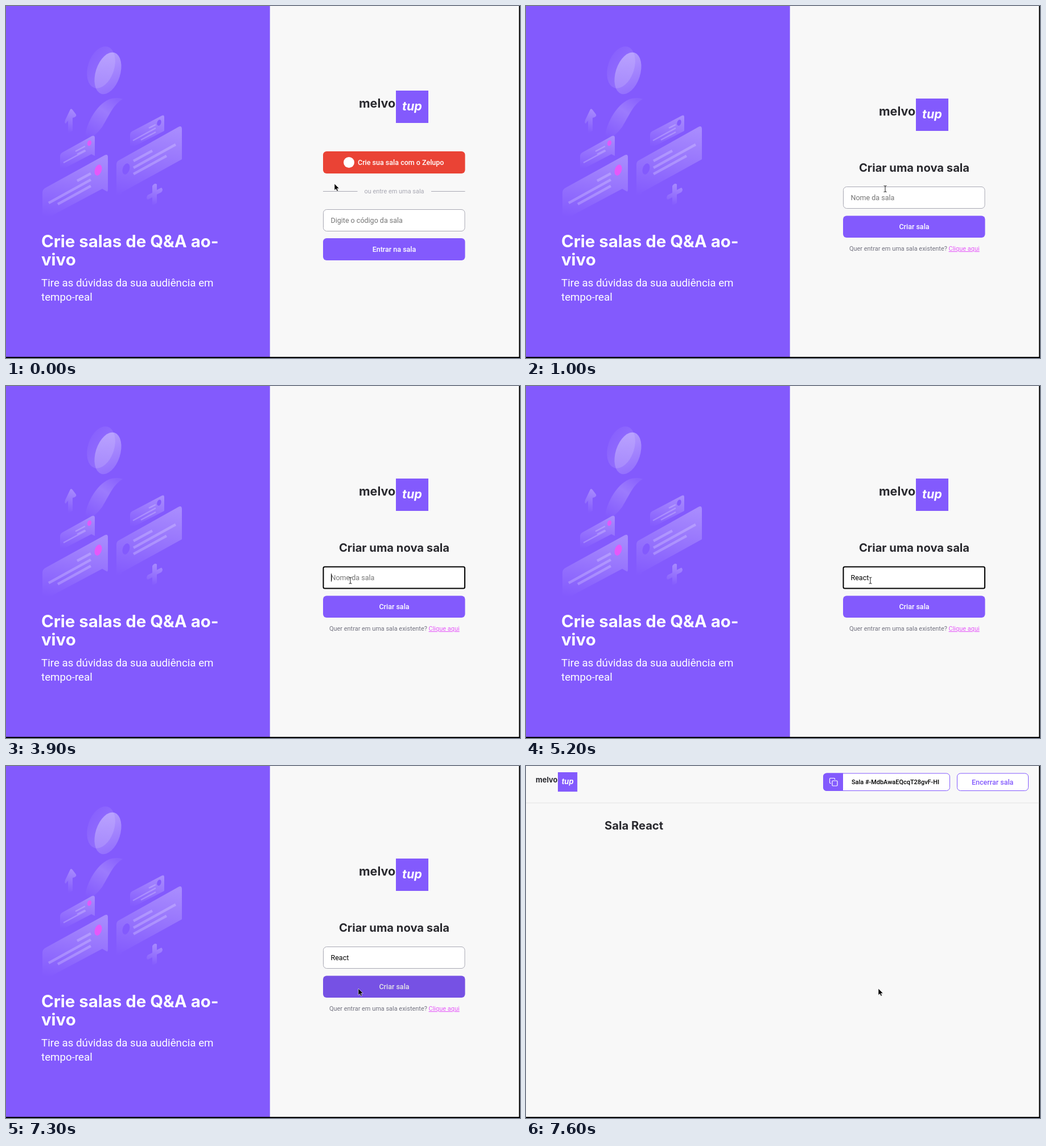
Recreate the animation shown at these times as an HTML page. Size 903 by 620 pixels, loop 8000 ms.

```html
<!DOCTYPE html>
<html lang="pt">
<head>
<meta charset="utf-8">
<title>Salas de Q&amp;A</title>
<style>
  html, body { margin: 0; width: 100%; height: 100%; overflow: hidden; background: #000; }
  svg { display: block; width: 903px; height: 620px; }
  text { font: 12.5px Roboto, sans-serif; white-space: pre; }
  .bold { font-family: Inter, sans-serif; font-weight: 700; fill: #29292e; }
  .h1 { font-size: 29.4px; fill: #fff; }
  .h2 { font-size: 20.2px; }
  .lead { font-size: 18.75px; fill: #fff; }
  .medium { font-weight: 500; }
  .small { font-size: 10.94px; }
  .mid { text-anchor: middle; }
  .white { fill: #fff; }
  .hint { fill: #757575; }
  .purple { fill: #835afd; }
  .field { fill: #fff; stroke: #a8a8b3; }
  .outline { fill: #fff; stroke: #835afd; }
  .bars { fill: none; stroke: #fff; stroke-opacity: .22; }
</style>
</head>
<body>
<svg viewBox="0 0 903 620">
  <defs>
    <linearGradient id="down" x1=".6" y1="0" x2=".45" y2="1">
      <stop stop-color="#fff" stop-opacity=".3"/><stop offset="1" stop-color="#fff" stop-opacity="0"/>
    </linearGradient>
    <linearGradient id="head" x1=".2" y1="0" x2=".6" y2="1">
      <stop stop-color="#fff" stop-opacity=".4"/><stop offset="1" stop-color="#fff" stop-opacity=".14"/>
    </linearGradient>
    <linearGradient id="faint" x1="0" y1="0" x2="1" y2=".5">
      <stop stop-color="#fff" stop-opacity=".03"/><stop offset="1" stop-color="#fff" stop-opacity=".14"/>
    </linearGradient>
    <linearGradient id="body" x1=".8" y1="0" x2=".2" y2="1">
      <stop stop-color="#fff" stop-opacity=".06"/><stop offset=".35" stop-color="#fff" stop-opacity=".2"/>
      <stop offset="1" stop-color="#fff" stop-opacity="0"/>
    </linearGradient>
    <g id="brand">
      <text class="bold" y="30" style="font-size:21.5px">melvo</text>
      <rect class="purple" x="65" width="57" height="57"/>
      <text class="bold mid white" x="93.500" y="35" style="font-size:21.5px;font-style:italic">tup</text>
    </g>
  </defs>

  <rect width="901.500" height="618" fill="#f8f8f8"/>

  <g id="sidebar">
    <rect class="purple" width="463.700" height="618"/>
    <ellipse cx="167" cy="108" rx="23" ry="38" transform="rotate(18 167 108)" fill="url(#faint)"/>
    <ellipse cx="179" cy="118.500" rx="21.500" ry="38" transform="rotate(18 179 118.500)" fill="url(#head)"/>
    <path d="M138 237C139 211 157 174 182 164Q195 160 205 164C188 174 183 190 169 213Q158 229 138 237Z" fill="url(#body)"/>
    <g fill="url(#down)">
      <path d="M113 182Q115 180 117 183L123 191Q125 195 117 197V220L109 224V202L105 207Q102 207 104 201Z"/>
      <path d="M95 265Q95 260 99 258L151 229Q156 227 156 232V264L150 261L95 290Z"/>
      <path d="M64 329Q64 324 68 321L173 263Q179 260 179 266V324Q179 328 176 326L169 322L64 378Z"/>
      <path d="M218 227Q218 223 221 221L274 193Q278 191 278 196V220L218 251Z"/>
      <path d="M194 280Q194 274 198 272L303 213Q309 210 309 217V270L204 328L197 341Q194 344 194 339Z"/>
    </g>
    <path class="bars" stroke-width="4.500" d="M125 308L149 295M75 347L149 306M91 349L149 317M224 273L257 255M224 285L298 244M224 296L282 264"/>
    <path class="bars" stroke-width="2.500" d="M122 256L139 247M125 261L139 254M101 276L140 255M251 215L263 209M223 237L263 215M237 236L263 222"/>
    <g fill="#e559f9">
      <ellipse cx="162" cy="289" rx="6" ry="10" transform="rotate(18 162 289)"/>
      <ellipse cx="146.500" cy="241.500" rx="3.500" ry="5" transform="rotate(18 146.500 241.500)"/>
    </g>
    <g class="purple">
      <ellipse cx="211" cy="287" rx="6" ry="10" transform="rotate(18 211 287)"/>
      <ellipse cx="269" cy="205.500" rx="3.500" ry="5.500" transform="rotate(18 269 205.500)"/>
    </g>
    <path d="M257 317Q261 311 265 314V324L273 320Q277 323 273 328L265 332V347L257 352V337L249 341Q245 338 249 333L257 329Z" fill="url(#down)"/>
    <text class="bold h1" x="62" y="424.500">Crie salas de Q&amp;A ao-<tspan x="62" y="457.300">vivo</tspan></text>
    <text class="lead" x="62" y="494">Tire as dúvidas da sua audiência em<tspan x="62" y="519">tempo-real</tspan></text>
  </g>

  <g id="home">
    <use href="#brand" x="620" y="149"/>
    <g id="loginButton">
      <rect x="557" y="256" width="249.500" height="39" rx="6.250" fill="#ea4335"/>
      <circle class="white" cx="602.500" cy="275.500" r="9.500"/>
      <text class="medium white" x="618" y="280">Crie sua sala com o Zelupo</text>
    </g>
    <path d="M557 326.500H617.500M747 326.500H806.500" stroke="#a8a8b3"/>
    <text class="small mid" x="682" y="330.300" fill="#a8a8b3">ou entre em uma sala</text>
    <rect class="field" x="557.500" y="358.500" width="248.500" height="38" rx="6"/>
    <text class="hint" x="570.500" y="381.500">Digite o código da sala</text>
    <rect class="purple" x="557" y="409" width="249.500" height="39" rx="6.250"/>
    <text class="medium white mid" x="682" y="433">Entrar na sala</text>
  </g>

  <g id="create">
    <use href="#brand" x="620" y="163"/>
    <text class="bold h2 mid" x="682" y="291.500">Criar uma nova sala</text>
    <rect class="field" id="field" x="557.500" y="318.500" width="248.500" height="38"/>
    <text class="hint" id="hint" x="570.500" y="341.700">Nome da sala</text>
    <text id="typed" x="570.500" y="341.700"></text>
    <path id="caret" d="M.5 330.500V344.500" stroke="#000"/>
    <g id="createButton">
      <rect class="purple" x="557" y="369.500" width="249.500" height="38.500" rx="6.250"/>
      <text class="medium white mid" x="682" y="393">Criar sala</text>
    </g>
    <text class="small" x="568" y="431" fill="#737380">Quer entrar em uma sala existente? <tspan fill="#e559f9" text-decoration="underline">Clique aqui</tspan></text>
  </g>

  <g id="room">
    <use href="#brand" transform="translate(17 11) scale(.6)"/>
    <path d="M0 65H901.500" stroke="#e2e2e2"/>
    <rect class="outline" x="522.500" y="13" width="222" height="30.500" rx="6"/>
    <path class="purple" d="M557 12.500V44H528.500Q522 44 522 37.500V19Q522 12.500 528.500 12.500Z"/>
    <g fill="none" stroke="#fff" stroke-width="1.200">
      <rect x="538" y="26" width="9" height="9" rx="1.200"/>
      <path d="M536 30.500H534.700Q533.500 30.500 533.500 29.300V22.700Q533.500 21.500 534.700 21.500H541.300Q542.500 21.500 542.500 22.700V24"/>
    </g>
    <text class="medium small mid" x="649" y="32">Sala #-MdbAwaEQcqT28gvF-HI</text>
    <rect class="outline" x="757.500" y="13" width="125" height="30.500" rx="6"/>
    <text class="medium mid purple" x="819.700" y="33">Encerrar sala</text>
    <text class="bold h2" id="roomTitle" x="138" y="111.500"></text>
  </g>

  <g id="arrow"><path d="M0 0V11.500L2.600 9.200L4.600 13.200L6.500 12.300L4.600 8.400H8.300Z" stroke="#fff" stroke-width=".6"/></g>
  <g id="hand"><path d="M3 1Q4 0 5 1V4.500L10 5.500Q11.500 6 11.300 8L10.500 12H4.500L1 8Q.8 6.500 3 7.500Z" stroke="#fff" stroke-width=".9"/></g>
  <g id="beam"><path d="M-2.500 -5.500Q0 -5.500 0 -4Q0 -5.500 2.500 -5.500M0 -4.500V4.500M-2.500 5.500Q0 5.500 0 4Q0 5.500 2.500 5.500" fill="none" stroke="#333" stroke-width="1.100"/></g>

  <path d="M901.500 0H903V620H0V618H901.500Z"/>
</svg>

<script>
const LOOP = 8000;
const $ = id => document.getElementById(id);
const show = (id, on) => { $(id).style.display = on ? '' : 'none'; };
const at = (cursor, x, y) => ({ cursor, x, y });

const initial = { page: 'home', ...at('arrow', 577, 313), hover: 0, focus: 0, caret: false, typed: '', title: '' };

// Each step changes part of the state from its time on.
const steps = [
  [100, at('arrow', 602, 309)],
  [300, { ...at('hand', 619, 285), hover: .3 }],
  [400, { ...at('hand', 628, 281), hover: .8 }],
  [500, { hover: 1 }],
  [600, { page: 'create', hover: 0 }],
  [700, at('arrow', 635, 281)],
  [900, at('arrow', 632, 303)],
  [1000, at('beam', 631, 322)],
  [3000, { ...at('beam', 605, 342.5), focus: 1, caret: true, hover: .75 }],
  [3200, { hover: 0 }],
  [3400, { caret: false }],
  [3900, { caret: true }],
  [4000, { typed: 'R' }],
  [4200, { typed: 'Re' }],
  [4400, { typed: 'Rea' }],
  [4500, { typed: 'React' }],
  [5200, { caret: false }],
  [5700, { caret: true }],
  [5800, { ...at('hand', 614, 371), hover: .4 }],
  [5900, { ...at('hand', 615, 376), hover: 1 }],
  [6100, at('hand', 616, 396)],
  [6200, at('hand', 616, 391)],
  [6400, { ...at('hand', 615, 391), caret: false }],
  [7000, { focus: .5 }],
  [7100, { focus: 0 }],
  [7300, at('arrow', 619, 392)],
  [7500, { page: 'room' }],
  [7600, { title: 'React' }],
];

function stateAt(time) {
  const past = steps.filter(([start]) => start <= time).map(([, change]) => change);
  return Object.assign({}, initial, ...past);
}

function drawField({ focus, typed, caret }) {
  const field = $('field');
  const shade = from => Math.round(from * (1 - focus));
  field.style.stroke = `rgb(${shade(168)},${shade(168)},${shade(179)})`;
  field.style.strokeWidth = 1 + focus;
  field.setAttribute('rx', 6 - 3.5 * focus);
  $('typed').textContent = typed;
  show('hint', !typed);
  show('caret', caret);
  const end = typed ? $('typed').getComputedTextLength() : 0;
  $('caret').setAttribute('transform', `translate(${Math.round(570.5 + end)} 0)`);
}

function draw() {
  const state = stateAt(performance.now() % LOOP);
  for (const page of ['home', 'create', 'room']) show(page, page === state.page);
  show('sidebar', state.page !== 'room');
  for (const id of ['loginButton', 'createButton']) {
    $(id).style.filter = state.hover ? `brightness(${1 - .1 * state.hover})` : 'none';
  }
  if (state.page === 'create') drawField(state);
  $('roomTitle').textContent = 'Sala ' + state.title;
  for (const cursor of ['arrow', 'hand', 'beam']) show(cursor, cursor === state.cursor);
  $(state.cursor).setAttribute('transform', `translate(${state.x} ${state.y})`);
  requestAnimationFrame(draw);
}
draw();
</script>
</body>
</html>
```
